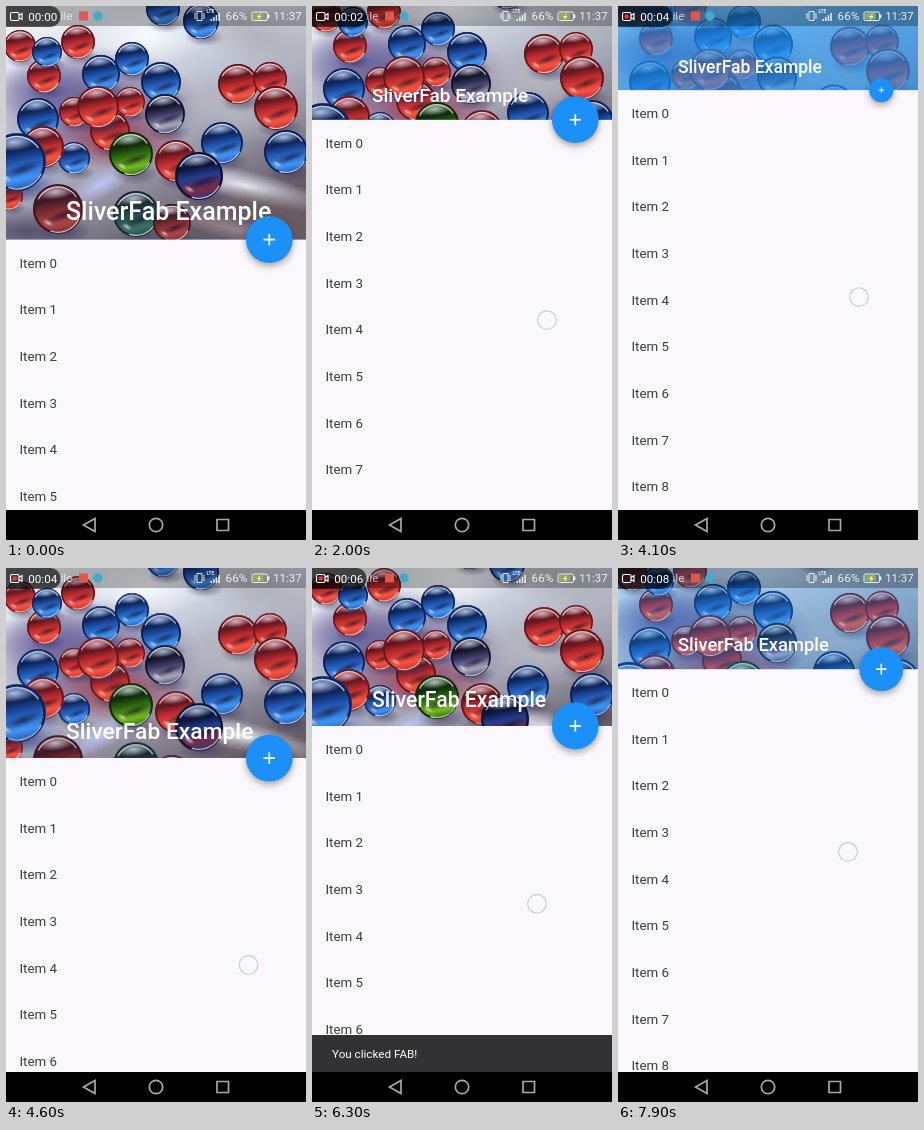
An HTML page with a canvas that plays this animation: 300 px wide and 534 px high, repeating every 8 s.

```html
<!DOCTYPE html>
<html lang="en">
<head>
<meta charset="utf-8">
<title>SliverFab Example</title>
<style>
  html, body { margin: 0; width: 100%; height: 100%; overflow: hidden; background: #000; }
  canvas { display: block; width: 300px; height: 534px; }
</style>
</head>
<body>
<canvas id="stage"></canvas>
<script>
const W = 300, H = 534, LOOP = 8000, TAU = Math.PI * 2;
const DP = 300 / 360;                       // stage pixels per layout unit
const MAX_HEAD = 233.6, MIN_HEAD = 66.9, RANGE = MAX_HEAD - MIN_HEAD;
const ROW = 56 * DP, NAV_Y = 504;
const dpr = Math.max(1, window.devicePixelRatio || 1);

const clamp = (v, a = 0, b = 1) => Math.min(b, Math.max(a, v));
const easeOut = p => 1 - (1 - p) ** 3;

function makeCanvas(canvas, w, h) {
  canvas.width = w * dpr;
  canvas.height = h * dpr;
  const c = canvas.getContext('2d');
  c.scale(dpr, dpr);
  return c;
}

// Smooth monotone curve through [time, value] points
function curve(points) {
  const slope = i => (points[i + 1][1] - points[i][1]) / (points[i + 1][0] - points[i][0]);
  const tangents = points.map((_, i) => {
    if (i === 0 || i === points.length - 1) return 0;
    const a = slope(i - 1), b = slope(i);
    return a * b <= 0 ? 0 : 2 * a * b / (a + b);
  });
  return t => {
    let i = 0;
    while (i < points.length - 2 && t >= points[i + 1][0]) i++;
    const [t0, v0] = points[i], [t1, v1] = points[i + 1];
    const d = t1 - t0, u = clamp((t - t0) / d), w = 1 - u;
    return v0 * (1 + 2 * u) * w * w + v1 * (3 - 2 * u) * u * u
      + d * u * w * (tangents[i] * w - tangents[i + 1] * u);
  };
}

const scrollAt = curve([
  [0, 0], [780, 0], [1000, 17.9], [2000, 119.8], [2700, 173], [3300, 173],
  [4100, 149.5], [4900, 0], [5850, 0], [6300, 75.5], [7100, 150], [7500, 150], [7900, 132.5], [8000, 126]
]);
const touchX = curve([[800, 222], [1000, 225], [2000, 235], [4100, 241], [4900, 243]]);

// ---- Header picture: glass marbles on a blurred table ----
const marbles = [
  ['red', [[14, 40, 16], [72, 36, 17], [38, 70, 17], [232, 78, 20], [264, 73, 17], [68, 106, 15], [124, 96, 15]]],
  ['blue', [[157, 3, 17], [195, 15, 18], [41, 46, 15], [126, 53, 17], [95, 68, 19], [155, 76, 20]]],
  ['red', [[270, 102, 22], [104, 125, 20], [92, 101, 21], [170, 155, 21]]],
  ['blue', [[32, 113, 21], [68, 152, 16], [216, 137, 21], [280, 146, 22]]],
  ['violet', [[159, 108, 20]]],
  ['red', [[37, 141, 21], [3, 190, 14]]],
  ['teal', [[130, 208, 23]]],
  ['wine', [[166, 217, 19]]],
  ['green', [[125, 148, 22]]],
  ['blue', [[11, 156, 29]]],
  ['navy', [[193, 170, 24]]],
  ['wine', [[52, 203, 25]]]
];
// glow at the foot, body, shaded top
const tints = {
  red: ['#f5533f', '#bb2b30', '#60161f'],
  blue: ['#3f94f5', '#2053ad', '#0e2255'],
  violet: ['#a8a5bd', '#3a3c66', '#141328'],
  navy: ['#7a2a44', '#213b8c', '#0b1334'],
  teal: ['#387068', '#264a4c', '#1b2c32'],
  wine: ['#a84544', '#7d2a33', '#3a1a26'],
  green: ['#72b81e', '#2c6511', '#10280c']
};

function blob(c, x, y, rx, ry, color, angle = 0) {
  c.save();
  c.translate(x, y);
  c.rotate(angle);
  c.scale(rx, ry);
  const g = c.createRadialGradient(0, 0, 0, 0, 0, 1);
  g.addColorStop(0, `rgba(${color},.95)`);
  g.addColorStop(1, `rgba(${color},0)`);
  c.fillStyle = g;
  c.fillRect(-1, -1, 2, 2);
  c.restore();
}

function marble(c, x, y, r, tint) {
  const [light, mid, dark] = tints[tint];
  c.globalAlpha = .6;
  blob(c, x + r * .2, y + r * .9, r * 1.1, r * .5, '55,45,85');
  c.globalAlpha = 1;
  c.save();
  c.beginPath();
  c.arc(x, y, r, 0, TAU);
  c.clip();
  const g = c.createLinearGradient(x - r * .2, y - r, x + r * .2, y + r);
  g.addColorStop(0, mid);
  g.addColorStop(.3, dark);
  g.addColorStop(.5, mid);
  g.addColorStop(.8, light);
  g.addColorStop(1, mid);
  c.fillStyle = g;
  c.fillRect(x - r, y - r, 2 * r, 2 * r);
  // streak of shade, window shine and caustic light
  c.globalAlpha = .65;
  blob(c, x + r * .2, y + r * .25, r * .75, r * .2, '18,12,32', -.35);
  c.globalAlpha = .75;
  blob(c, x - r * .1, y - r * .68, r * .75, r * .3, '235,242,255', -.1);
  blob(c, x - r * .4, y + r * .55, r * .25, r * .12, '255,235,235', .5);
  c.restore();
  c.strokeStyle = dark;
  c.lineWidth = r * .09;
  c.beginPath();
  c.arc(x, y, r * .95, 0, TAU);
  c.stroke();
  c.strokeStyle = 'rgba(255,255,255,.75)';
  c.lineWidth = 1.2;
  c.beginPath();
  c.arc(x, y, r * .88, 3.6, 5.7);
  c.moveTo(x + r * .84, y + r * .4);
  c.arc(x, y, r * .93, .45, 1.9);
  c.stroke();
}

const photo = document.createElement('canvas');
function paintPhoto() {
  const c = makeCanvas(photo, W, 236);
  const g = c.createLinearGradient(60, 0, 160, 236);
  g.addColorStop(0, '#eef2f8');
  g.addColorStop(.35, '#cdd4e0');
  g.addColorStop(.65, '#a2a3b4');
  g.addColorStop(1, '#655c68');
  c.fillStyle = g;
  c.fillRect(0, 0, W, 236);
  blob(c, 140, 30, 60, 30, '250,252,255');
  blob(c, 250, 30, 90, 32, '176,178,184', .3);
  blob(c, 225, 105, 60, 30, '180,182,190', .3);
  blob(c, 85, 100, 110, 60, '92,70,128');
  blob(c, 45, 85, 60, 32, '105,100,160');
  blob(c, 110, 135, 70, 30, '165,60,80');
  blob(c, 240, 180, 90, 16, '236,238,246', .25);
  blob(c, 275, 215, 90, 32, '108,90,92', .2);
  blob(c, 95, 178, 40, 14, '190,200,245', -.5);
  blob(c, 15, 182, 45, 16, '110,130,215', -.3);
  blob(c, 20, 225, 70, 24, '84,76,104');
  blob(c, 225, 222, 70, 12, '150,132,142', .25);
  for (const [tint, list] of marbles)
    for (const [x, y, r] of list) marble(c, x, y, r, tint);
}

// ---- Screen ----
const ctx = makeCanvas(document.getElementById('stage'), W, H);

function text(str, x, y, size, color, weight = 400) {
  ctx.font = `${weight} ${size}px Roboto, sans-serif`;
  ctx.fillStyle = color;
  ctx.fillText(str, x, y);
}
function rect(x, y, w, h, color) {
  ctx.fillStyle = color;
  ctx.fillRect(x, y, w, h);
}
function disc(x, y, r, color) {
  ctx.fillStyle = color;
  ctx.beginPath();
  ctx.arc(x, y, r, 0, TAU);
  ctx.fill();
}
function line(color, width, path) {
  ctx.strokeStyle = color;
  ctx.lineWidth = width;
  ctx.beginPath();
  path();
  ctx.stroke();
}

function drawList(scroll) {
  rect(0, 0, W, NAV_Y, '#faf8fd');
  for (let i = 0; i < 12; i++)
    text(`Item ${i}`, 13.4, MAX_HEAD - scroll + 28 + i * ROW, 16 * DP, '#3c3c3f');
}

function drawHeader(scroll) {
  const head = Math.max(MIN_HEAD, MAX_HEAD - scroll);
  const t = (MAX_HEAD - head) / RANGE;
  ctx.save();
  ctx.beginPath();
  ctx.rect(0, 0, W, head);
  ctx.clip();
  rect(0, 0, W, head, '#2196f3');
  ctx.globalAlpha = 1 - clamp((t - .72) / .28);
  ctx.drawImage(photo, 0, -t * RANGE / 4, W, 236);
  ctx.restore();
  const scale = 1.5 - t / 2;
  text('SliverFab Example', 60, head - 13.3 - 4.1 * scale, 20 * DP * scale, '#fff', 500);
  rect(0, 0, W, 20, 'rgba(0,0,0,.28)');
}

function drawFab(scroll, time) {
  const scale = clamp((170 - scroll) / 40);
  if (!scale) return;
  const press = clamp((time - 5320) / 80) * clamp((5700 - time) / 200);
  ctx.save();
  ctx.translate(263.3, MAX_HEAD - scroll);
  ctx.scale(scale, scale);
  ctx.shadowColor = 'rgba(0,0,0,.35)';
  ctx.shadowBlur = (7 + 5 * press) * dpr;
  ctx.shadowOffsetY = (3 + 3 * press) * dpr;
  disc(0, 0, 23.4, '#1b90f8');
  ctx.shadowColor = 'transparent';
  disc(0, 0, 23.4, `rgba(255,255,255,${.06 * press})`);
  rect(-5.8, -.85, 11.6, 1.7, '#fff');
  rect(-.85, -5.8, 1.7, 11.6, '#fff');
  ctx.restore();
}

function drawSnackbar(time) {
  const enter = easeOut(clamp((time - 5520) / 250));
  const leave = easeOut(clamp((time - 7270) / 250));
  const h = 37 * (enter - leave);
  if (h <= 0) return;
  rect(0, NAV_Y - h, W, h, '#323234');
  ctx.globalAlpha = clamp((h / 37 - .7) / .3);
  text('You clicked FAB!', 20, NAV_Y - h + 22.7, 14 * DP, '#fff');
  ctx.globalAlpha = 1;
}

function drawTouch(scroll, time) {
  let x, y;
  if (time > 780 && time < 4920) {
    x = touchX(time);
    y = 434 - scroll + 6.5 * clamp((time - 2000) / 2100);
  } else if (time > 5320 && time < 5520) {
    x = 276;
    y = 235.5;
  } else if (time > 5850) {
    const p = clamp((time - 6300) / 1600);
    x = 225 + 5 * p;
    y = 411.3 - scroll + 5 * p;
  } else return;
  disc(x, y, 9.3, 'rgba(245,248,253,.55)');
  line('rgba(172,184,202,.65)', 1.2, () => ctx.arc(x, y, 9.3, 0, TAU));
}

function drawStatus(time) {
  const ink = 'rgba(255,255,255,.88)';
  const sec = Math.floor((time + 150) / 1000);
  text('ile', 54.5, 14.3, 11.7, 'rgba(255,255,255,.7)');
  rect(73, 5.5, 9, 9, '#df574e');
  disc(92, 10, 4.7, '#42aacb');

  ctx.fillStyle = 'rgba(0,0,0,.62)';
  ctx.beginPath();
  ctx.roundRect(-10, 0, 64.5, 21, 10);
  ctx.fill();
  line('#fff', 1.1, () => {
    ctx.roundRect(4.5, 6.5, 8.5, 8, 1.5);
    ctx.moveTo(13, 9.5);
    ctx.lineTo(16, 7.5);
    ctx.lineTo(16, 13.5);
    ctx.lineTo(13, 11.5);
  });
  if ([1, 4, 5, 6].includes(sec)) disc(8.7, 10.5, 2.2, '#f0342e');
  text(`00:0${sec}`, 22.3, 14.6, 11.6, '#fff');

  // vibrate mode and signal
  line(ink, 1, () => {
    ctx.rect(191, 5.5, 5, 9);
    for (const x of [189, 198]) {
      ctx.moveTo(x, 7);
      ctx.lineTo(x, 13);
    }
  });
  text('LTE', 200.5, 6.8, 4.8, ink, 700);
  for (let i = 0; i < 4; i++) rect(204.5 + i * 2.6, 13 - i * 2, 1.5, 2 + i * 2, ink);

  text('66%', 219.6, 14.3, 11.7, ink);
  line(ink, 1, () => ctx.roundRect(246, 6, 15.5, 8.5, 1.5));
  rect(262, 8.5, 1.4, 3.6, ink);
  rect(247.2, 7.2, 10.5, 6.1, '#8fb04e');
  line('#fff', 1, () => {
    ctx.moveTo(254.5, 7.8);
    ctx.lineTo(251.5, 10.5);
    ctx.lineTo(255, 10.5);
    ctx.lineTo(252, 13.2);
  });
  text('11:37', 267.2, 14.3, 11.4, ink);
}

function drawNav() {
  rect(0, NAV_Y, W, H - NAV_Y, '#000');
  line('#a8a8a8', 1.7, () => {
    ctx.moveTo(77.5, 519);
    ctx.lineTo(89, 512.5);
    ctx.lineTo(89, 525.5);
    ctx.closePath();
    ctx.moveTo(156.7, 519);
    ctx.arc(150, 519, 6.7, 0, TAU);
    ctx.rect(211, 513.5, 11.5, 11);
  });
}

function render(time) {
  const scroll = scrollAt(time);
  drawList(scroll);
  drawHeader(scroll);
  drawFab(scroll, time);
  drawSnackbar(time);
  drawNav();
  drawStatus(time);
  drawTouch(scroll, time);
}

paintPhoto();
const start = performance.now();
function tick() {
  render((performance.now() - start) % LOOP);
  requestAnimationFrame(tick);
}
tick();
</script>
</body>
</html>
```
